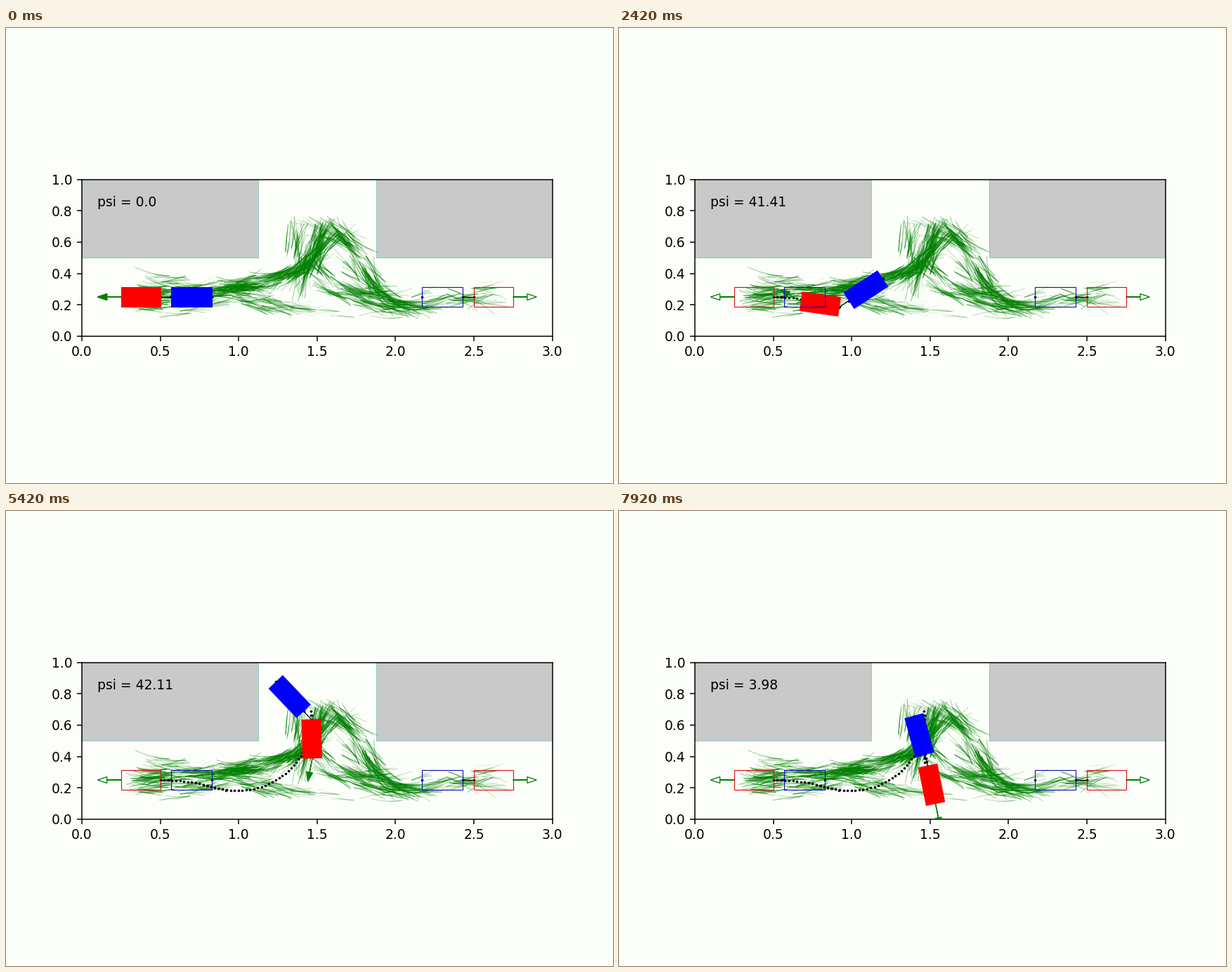
A matplotlib script that plays this animation: 864x648 px, repeating every 8000 ms.

```python
import numpy as np
import matplotlib.pyplot as plt
from matplotlib.animation import FuncAnimation
from matplotlib.collections import LineCollection
from matplotlib.patches import Polygon, Rectangle

FRAMES = 96
STEP = 0.025          # distance driven per frame
HALF = 0.0625         # half width of both bodies
TRUCK, BAR, TRAILER = 0.25, 0.07, 0.26
PAPER = "#fcfefa"

plt.rcParams["font.family"] = "DejaVu Sans"
rng = np.random.default_rng(12)


def unit(deg):
    a = np.radians(deg)
    return np.array([np.cos(a), np.sin(a)])


# ---- manoeuvre: heading, hinge angle, steering and hitch path ----
t = np.arange(FRAMES)
turns = [0, 14, 17, 23, 29, 52, 63, 65, 68, 76, 77, 85, 95]
theta = np.interp(t, turns, [0, -15.5, -12, -17, -8.2, 60.4, 94, 91.5, 87.5,
                             88.6, 89.9, 101.5, 101.5])
psi = np.interp(t, turns, [0, 38.34, 43, 34, 41.41, 44.56, 45.4, 42.11, 37.5,
                           17, 17.02, 8.5, 3.98])
psi[:14] = psi[14] * (t[:14] / 14) ** 1.63
phi = theta + psi

# +1 while backing up, -1 while pulling forward
gear = np.ones(FRAMES - 1)
for a, b in [(17, 23), (63, 76), (85, 95)]:
    gear[a:b] = -1

rate = np.radians(np.diff(theta)) * gear
lock = -np.degrees(np.arctan(rate * TRUCK / STEP))
steer = np.r_[0, (lock[1:] + lock[:-1]) / 2, lock[-1]]

mid = (theta[1:] + theta[:-1]) / 2
moves = (STEP * gear * unit(mid)).T
hitch = np.array([0.5, 0.25]) + np.vstack([np.zeros(2), np.cumsum(moves, axis=0)])
pins = {0: (0.5, 0.25), 14: (0.847, 0.203), 29: (0.923, 0.187),
        52: (1.409, 0.425), 65: (1.463, 0.637), 77: (1.465, 0.388),
        95: (1.485, 0.342)}
keys = list(pins)
for k in range(2):
    drift = [pins[f][k] - hitch[f, k] for f in keys]
    hitch[:, k] += np.interp(t, keys, drift)

# ---- stage ----
fig, ax = plt.subplots(figsize=(6.4, 4.8), dpi=135, facecolor=PAPER)
ax.set_facecolor(PAPER)
ax.set_aspect("equal")
ax.set_xlim(0, 3)
ax.set_ylim(0, 1)
ax.set_xticks(np.arange(0, 3.1, 0.5))
ax.set_yticks(np.linspace(0, 1, 6))

for x in (0, 1.875):
    ax.add_patch(Rectangle((x, 0.5), 1.125, 0.5, fc="#c8c9c8", ec="#8ecfc4",
                           lw=0.6, zorder=0.5))


# ---- search tree: fans of short arcs along bent guides ----
lines, tints = [], []


def fan(c, head, weight):
    for _ in range(5):
        length = rng.uniform(0.09, 0.22)
        ang = head + rng.uniform(-2.2, 2.2) * length * np.linspace(0, 1, 7)
        steps = np.column_stack([np.cos(ang), np.sin(ang)]) * length / 6
        line = c + np.cumsum(steps, axis=0)
        (x0, y0), (x1, y1) = line.min(axis=0), line.max(axis=0)
        if x0 > 0.28 and x1 < 2.72 and y0 > 0.11 and y1 < 0.77:
            lines.append(line)
            tints.append((0, 0.5, 0, weight * rng.uniform(0.25, 1)))


def strand(x0, y0, x1, y1, bend, count, weight):
    """Scatter fans along a line that sags or rises by bend."""
    dx, dy = x1 - x0, y1 - y0
    for s in rng.uniform(0, 1, count):
        slope = dy + 4 * bend * (1 - 2 * s)
        head = np.arctan2(slope, dx)
        side = np.array([-np.sin(head), np.cos(head)])
        c = np.array([x0 + s * dx, y0 + s * dy + 4 * bend * s * (1 - s)])
        c = c + side * rng.normal(0, 0.026)
        head += rng.normal(0, 0.1) + np.pi * rng.integers(2)
        fan(c - 0.07 * np.array([np.cos(head), np.sin(head)]), head, weight)


# approach lane on the left
strand(.35, .25, 1.1, .31, 0, 62, .55)
strand(.32, .2, .9, .22, -.02, 20, .45)
strand(.38, .34, .85, .33, 0, 10, .45)
strand(.9, .26, 1.3, .15, .01, 16, .45)
# climb into the gap
strand(.85, .3, 1.4, .43, -.03, 42, .6)
strand(1.3, .37, 1.6, .64, -.02, 38, .6)
strand(1.35, .37, 1.38, .64, 0, 13, .5)
strand(1.43, .36, 1.52, .68, 0, 34, .55)
strand(1.45, .73, 1.7, .6, 0, 10, .3)
# descent and right lane
strand(1.62, .66, 1.85, .33, .04, 34, .5)
strand(1.8, .38, 2.1, .19, -.04, 22, .5)
strand(1.5, .45, 1.95, .28, -.06, 28, .45)
strand(1.55, .32, 2.15, .19, -.03, 38, .5)
strand(1.25, .17, 1.7, .13, 0, 10, .3)
strand(1.9, .16, 2.65, .28, 0, 22, .35)
strand(2.3, .28, 2.65, .2, 0, 8, .35)
strand(2.45, .36, 2.65, .33, 0, 3, .35)
ax.add_collection(LineCollection(lines, colors=tints, linewidths=0.5, zorder=1))


# ---- start and goal outlines ----
def arrow(x, y, dx, dy, fill, z):
    return ax.arrow(x, y, dx, dy, width=0.001, head_width=0.04,
                    head_length=0.06, length_includes_head=True,
                    fc=fill, ec="green", lw=0.7, zorder=z)


def outline(x, w, color):
    ax.add_patch(Rectangle((x, 0.25 - HALF), w, 2 * HALF, fill=False,
                           ec=color, lw=0.6, zorder=6))


dots = dict(color="black", ls="none", marker="o", ms=1.9, mew=0, zorder=2)
link = dict(color="black", lw=0.7, zorder=2)
for x, sign in ((0.5, 1), (2.5, -1)):
    front = x - sign * TRUCK
    near = x + sign * BAR
    far = near + sign * TRAILER
    outline(min(front, x), TRUCK, "#d81010")
    outline(min(near, far), TRAILER, "#1010b0")
    arrow(front, 0.25, -sign * 0.15, 0, PAPER, 1.5)
    ax.plot([x, near], [0.25] * 2, **link)
    ax.plot([x, near, far], [0.25] * 3, **dots)

# ---- moving parts ----
trail, = ax.plot([], [], **dots)
joints, = ax.plot([], [], **dots)
bar, = ax.plot([], [], **link)
wheel = arrow(0.25, 0.25, -0.15, 0, "green", 3)
truck = ax.add_patch(Polygon(np.zeros((4, 2)), fc="red", ec="none", zorder=4))
trailer = ax.add_patch(Polygon(np.zeros((4, 2)), fc="blue", ec="none", zorder=5))
label = ax.text(0.1, 0.83, "", fontsize=10, zorder=7)


def body(a, b, deg):
    n = HALF * unit(deg + 90)
    return [a + n, b + n, b - n, a - n]


def update(i):
    h = hitch[i]
    nose = h - TRUCK * unit(theta[i])
    near = h + BAR * unit(phi[i])
    far = near + TRAILER * unit(phi[i])
    truck.set_xy(body(nose, h, theta[i]))
    trailer.set_xy(body(near, far, phi[i]))
    trail.set_data(hitch[:i + 1, 0], hitch[:i + 1, 1])
    bar.set_data([h[0], near[0]], [h[1], near[1]])
    joints.set_data([near[0], far[0]], [near[1], far[1]])
    d = 0.15 * unit(theta[i] + 180 + steer[i])
    wheel.set_data(x=nose[0], y=nose[1], dx=d[0], dy=d[1])
    label.set_text(f"psi = {round(float(psi[i]), 2)}")
    return truck, trailer, trail, bar, joints, wheel, label


anim = FuncAnimation(fig, update, frames=FRAMES, interval=8000 / FRAMES,
                     repeat=True, repeat_delay=0)
plt.show()
```
